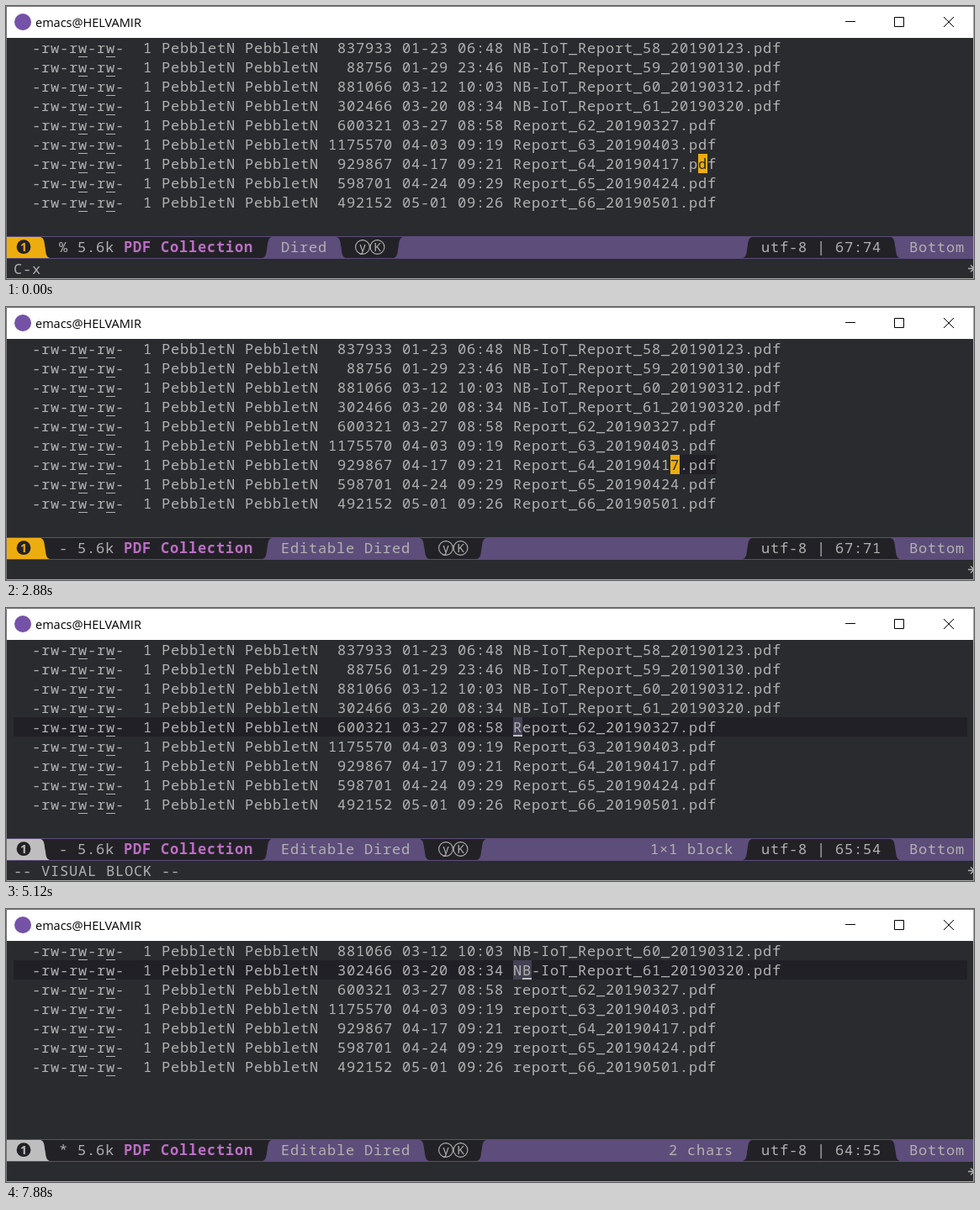
An HTML page for the animation above (8 s loop, 1151x325 px).

```html
<!DOCTYPE html>
<html lang="en">
<head>
<meta charset="utf-8">
<title>Editable Dired</title>
<style>
  html, body { margin: 0; width: 100%; height: 100%; overflow: hidden; background: #292b2e; }
  svg { display: block; width: 1151px; height: 325px; }
  text { white-space: pre; }
  .mono { font: 17px "Noto Sans Mono", "DejaVu Sans Mono", monospace; letter-spacing: .8px; fill: #b2b2b2; }
  .title { font: 14.5px "Open Sans", "Noto Sans", sans-serif; fill: #000; }
  .badge { font: 14px "Noto Sans", sans-serif; fill: #b2b2b2; text-anchor: middle; }
</style>
</head>
<body>
<svg viewBox="0 0 1151 325" xmlns="http://www.w3.org/2000/svg">
  <rect width="1151" height="325" fill="#292b2e"/>
  <g id="view"></g>
  <rect width="1151" height="38" fill="#fff"/>
  <circle cx="20" cy="19" r="10" fill="#7452a8"/>
  <text class="title" x="35" y="24.5">emacs@HELVAMIR</text>
  <path d="M998 18.5h12M1056.5 13.5h11v11h-11zM1115 13l12 12M1127 13l-12 12" fill="none" stroke="#000"/>
  <path d="M1150.5 0V324.5H0" fill="none" stroke="#a6a6a6"/>
  <path d="M.5 325V.5H1151" fill="none" stroke="#77777a"/>
</svg>
<script>
const LOOP = 8000, CELL = 11, LINE = 23, LEFT = 9, TOP = 38;
const BG = '#292b2e', BAND = '#212026', DARK = '#222226', PURPLE = '#5d4d7a', FG = '#b2b2b2';
const COLORS = { normal: '#eead0e', insert: '#66cd00', visual: '#bebebe' };
const USER = 'PebbletN';

const files = [
  ['837933 01-23 06:48', 'NB-IoT_Report_58_20190123'],
  ['88756 01-29 23:46', 'NB-IoT_Report_59_20190130'],
  ['881066 03-12 10:03', 'NB-IoT_Report_60_20190312'],
  ['302466 03-20 08:34', 'NB-IoT_Report_61_20190320'],
  ['600321 03-27 08:58', 'Report_62_20190327'],
  ['1175570 04-03 09:19', 'Report_63_20190403'],
  ['929867 04-17 09:21', 'Report_64_20190417'],
  ['598701 04-24 09:29', 'Report_65_20190424'],
  ['492152 05-01 09:26', 'Report_66_20190501']
];

// Each step changes part of the editor state
const steps = [
  [0, { row: 6, col: 74, mode: 'normal', major: 'Dired', flag: '%', echo: 'C-x', sel: '', band: false, trail: false, lower: false }],
  [80, { echo: 'C-x-' }],
  [250, { echo: '', mode: 'insert', major: 'Editable Dired', flag: '-' }],
  [320, { echo: 'Press C-c C-c when finished or C-c ESC to abort changes' }],
  [2190, { col: 73, mode: 'normal', echo: '', trail: true }],
  [2500, { col: 72 }],
  [2880, { col: 71 }],
  [3340, { col: 70 }],
  [3415, { col: 68 }],
  [3490, { col: 66 }],
  [3570, { col: 63 }],
  [3645, { col: 61 }],
  [3725, { col: 59 }],
  [3800, { col: 58 }],
  [3970, { row: 5, band: true, trail: false }],
  [4200, { row: 4 }],
  [4270, { col: 57 }],
  [4500, { col: 56 }],
  [4670, { col: 55 }],
  [4970, { col: 54 }],
  [5120, { mode: 'visual', sel: 'block', echo: '-- VISUAL BLOCK --' }],
  [5350, { row: 5, echo: '' }],
  [5520, { row: 6 }],
  [5760, { row: 7 }],
  [5990, { row: 8 }],
  [6070, { row: 2, mode: 'normal', sel: '', flag: '*', lower: true }],
  [6700, { row: 1 }],
  [7630, { mode: 'visual', sel: 'char', echo: '-- VISUAL --' }],
  [7880, { col: 55, echo: '' }]
];
const visited = [75, 74, 73, 72, 71, 70, 68, 66, 63, 61, 59];

const rect = (x, y, w, h, fill) => `<rect x="${x}" y="${y}" width="${w}" height="${h}" fill="${fill}"/>`;
const mono = (x, y, s, extra = '') => `<text class="mono" xml:space="preserve" x="${x}" y="${y}" ${extra}>${s}</text>`;
const colX = c => LEFT + c * CELL;
const rowY = r => TOP + r * LINE;
const cell = (r, c, fill) => rect(colX(c), rowY(r), CELL, LINE, fill);

function lines(lower) {
  const shown = lower ? files.slice(2) : files;
  return shown.map(([info, name]) => {
    const n = lower ? name.replace(/^R/, 'r') : name;
    return `  -rw-rw-rw-  1 ${USER} ${USER} ${info.padStart(19)} ${n}.pdf`;
  });
}

// Segment with curved ends, from the outer left to the outer right edge;
// it is widest at the top, or at the bottom when flipped
function segment(x0, x1, flipped) {
  const [y, s] = flipped ? [300, -1] : [275, 1];
  return `<path fill="${DARK}" d="M${x0} ${y}c5 ${s} 4.5 ${8 * s} 5.5 ${12.5 * s}s.5 ${11.5 * s} 5.5 ${12.5 * s}` +
    `H${x1 - 11}c5 ${-s} 4.5 ${-8 * s} 5.5 ${-12.5 * s}s.5 ${-11.5 * s} 5.5 ${-12.5 * s}z"/>`;
}

function badge(x, letter) {
  return `<circle cx="${x}" cy="287" r="8.4" fill="none" stroke="${FG}" stroke-width="1.1"/>` +
    `<text class="badge" x="${x}" y="291.5">${letter}</text>`;
}

function modeLine(s) {
  const end = 327 + s.major.length * CELL;
  const lineNo = s.row + (s.lower ? 63 : 61);
  const info = s.sel === 'block' ? `${s.row - 3}×1 block` : s.sel ? `${s.col - 53} chars` : '';
  const color = COLORS[s.mode];
  return rect(1, 274, 1150, 27, PURPLE) +
    rect(1, 275, 58, 25, color) +
    segment(41, 316) + segment(end + 11, end + 90) + segment(876, 1063, true) +
    `<circle cx="21" cy="286.7" r="8.4" fill="${DARK}"/>` +
    `<text class="badge" x="21" y="291.7" style="font-weight:bold;fill:${color}">1</text>` +
    mono(63, 293, s.flag + ' 5.6k') +
    mono(140, 293, 'PDF Collection', 'style="font-weight:bold;fill:#bc6ec5"') +
    mono(327, 293, s.major) +
    badge(end + 42, 'y') + badge(end + 59.5, 'K') +
    mono(865 - info.length * CELL, 293, info) +
    mono(898, 293, `utf-8 | ${lineNo}:${s.col}`) +
    mono(1074, 293, 'Bottom');
}

function cursor(s, text) {
  const x = colX(s.col), y = rowY(s.row), color = COLORS[s.mode];
  if (s.mode === 'insert') return rect(x, y, 2, LINE, color);
  if (s.mode === 'visual') return rect(x, y + 21, CELL, 2, color);
  return cell(s.row, s.col, color) + mono(x, y + 18, text[s.col], `style="fill:${BG}"`);
}

function buffer(s) {
  const rows = lines(s.lower);
  let out = '';
  if (s.band) out += rect(LEFT, rowY(s.row), 1134, LINE, BAND);
  if (s.trail) for (const c of visited) if (c > s.col) out += cell(s.row, c, BAND);
  if (s.sel === 'block') for (let r = 4; r <= s.row; r++) out += cell(r, 54, '#444155');
  if (s.sel === 'char') for (let c = 54; c <= s.col; c++) out += cell(s.row, c, '#444155');
  rows.forEach((text, r) => {
    out += mono(LEFT, rowY(r) + 18, text);
    for (const c of [7, 10]) out += rect(colX(c), rowY(r) + 22, CELL, 1, FG);
  });
  return out + cursor(s, rows[s.row]);
}

function draw(s) {
  document.getElementById('view').innerHTML = buffer(s) + modeLine(s) + mono(LEFT, 319, s.echo) +
    `<path d="M1144 312.5h7M1147 308.5l4 4-4 4" fill="none" stroke="${FG}" stroke-width="1.5"/>`;
}

const start = performance.now();
let current = -1;
function tick() {
  const t = (performance.now() - start) % LOOP;
  const count = steps.filter(([at]) => at <= t).length;
  if (count !== current) {
    current = count;
    draw(Object.assign({}, ...steps.slice(0, count).map(step => step[1])));
  }
  requestAnimationFrame(tick);
}
tick();
</script>
</body>
</html>
```
